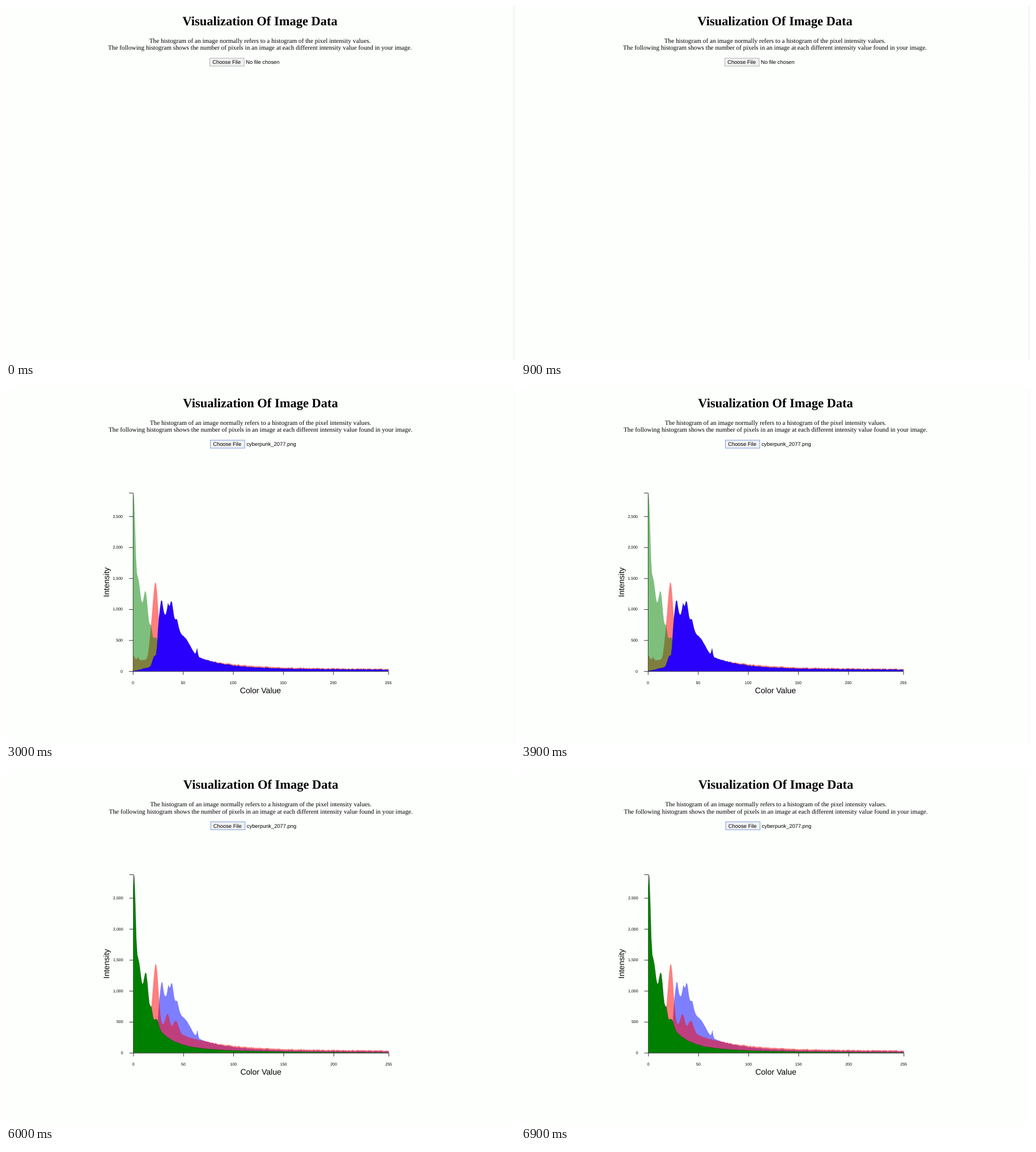
Write an HTML page that moves like this. It is 898 by 624 pixels and loops after 7.5 s.

```html
<!DOCTYPE html>
<html lang="en">
<head>
<meta charset="utf-8">
<title>Visualization Of Image Data</title>
<style>
  html, body { margin: 0; width: 100%; height: 100%; overflow: hidden; background: #fdfffd; }
  svg { display: block; width: 898px; height: 624px; }
  text { fill: #000; text-rendering: geometricPrecision; }
  .serif { font: 11.27px "Liberation Serif", "Times New Roman", serif; text-anchor: middle; }
  .title { font-size: 22.5px; font-weight: bold; }
  .sans { font: 9.37px "Liberation Sans", Arial, sans-serif; }
  .tick { font-size: 7.03px; }
  .label { font-size: 14.06px; text-anchor: middle; }
  .axis { fill: none; stroke: #000; stroke-width: 0.8; }
  .area { opacity: 0.5; }
  .active { opacity: 1; stroke: #000; stroke-opacity: 0.3; stroke-width: 0.7; }
  .scene { visibility: hidden; animation: show 7.5s step-end infinite; }
  @keyframes show {
    0% { visibility: visible; }
    20%, 100% { visibility: hidden; }
  }
</style>
</head>
<body>
<svg id="stage" viewBox="0 0 898 624"></svg>
<script>
const X0 = 223, Y0 = 498, MAX = 255, TOP = 2880;
const px = v => X0 + v * 1.767;
const py = v => Y0 - v * 0.1092;

// decays: [height, length]; peaks: [centre, height, width];
// onset: [centre, width] of the rise from the low plateau to the decays.
const channels = {
  red: {
    soft: '#f00', solid: '#f00', grain: 8, low: 185, onset: [16.2, 0.9],
    decays: [[800, 40], [60, 500]],
    peaks: [[0, 85, 1.3], [5, 45, 0.7], [19.6, 180, 1.8], [22.8, 890, 2.3], [34.2, 240, 2], [42.5, 190, 2.6]]
  },
  green: {
    soft: '#008000', solid: '#008000', grain: 3, low: 0, onset: [-20, 1],
    decays: [[1470, 16.2], [110, 90]],
    peaks: [[0.9, 1350, 1.3], [5.5, 330, 2], [12.7, 530, 2], [18, 160, 1], [23.5, 110, 1.8]]
  },
  blue: {
    soft: '#00f', solid: '#2800fc', grain: 6, low: 0, onset: [24.6, 0.6],
    decays: [[1850, 28], [60, 300]],
    peaks: [[14, 55, 6], [21.5, 200, 2.2], [28.5, 300, 1.3], [35, 150, 0.8], [38, 400, 6.5],
      [38.5, 220, 1.3], [44, 100, 1.2], [53, 165, 5], [64, 120, 0.6]]
  }
};

function random(seed) {
  return () => (seed = (seed * 16807) % 2147483647) / 2147483647;
}

const sum = (list, fn) => list.reduce((total, item) => total + fn(item), 0);

function count(v, { low, onset: [start, width], decays, peaks }) {
  const rise = 1 / (1 + Math.exp((start - v) / width));
  const body = sum(decays, ([h, len]) => h * Math.exp(-v / len));
  const bumps = sum(peaks, ([c, h, w]) => h * Math.exp(-((v - c) ** 2) / (2 * w * w)));
  return low * (1 - rise) + body * rise + bumps;
}

function areaPath(channel) {
  const rnd = random(70707);
  let d = `M${px(0)} ${Y0}`;
  for (let v = 0; v <= MAX; v++) {
    const n = count(v, channel) + (rnd() * 2 - 1) * channel.grain;
    d += `L${px(v).toFixed(2)} ${py(Math.min(TOP, Math.max(0, n))).toFixed(2)}`;
  }
  return d + `L${px(MAX)} ${Y0}Z`;
}

const text = (x, y, cls, str, extra = '') =>
  `<text x="${x}" y="${y}" class="${cls}" ${extra}>${str}</text>`;

function header(file, border) {
  return text(448, 32.7, 'serif title', 'Visualization Of Image Data') +
    text(448, 63.4, 'serif', 'The histogram of an image normally refers to a histogram of the pixel intensity values.') +
    text(448, 76, 'serif', 'The following histogram shows the number of pixels in an image at each different intensity value found in your image.') +
    `<rect x="359.5" y="90.7" width="60.6" height="14" fill="#f1f1f2" stroke="${border}"/>` +
    text(364.2, 101.2, 'sans', 'Choose File') +
    text(423.2, 101.2, 'sans', file);
}

function axes() {
  let lines = `M215.5 ${py(TOP)}H${X0}V${Y0}H${px(MAX)}`;
  let labels = '';
  for (let v = 0; v <= 2500; v += 500) {
    lines += `M215.5 ${py(v)}H${X0}`;
    labels += text(205, py(v) + 2.4, 'sans tick', v.toLocaleString('en-US'), 'text-anchor="end"');
  }
  for (const v of [0, 50, 100, 150, 200, MAX]) {
    lines += `M${px(v)} ${Y0}v6`;
    labels += text(px(v), 520.4, 'sans tick', v, 'text-anchor="middle"');
  }
  return `<path class="axis" d="${lines}" transform="translate(0.35 0.35)"/>` + labels +
    text(448, 536.4, 'sans label', 'Color Value') +
    text(0, 0, 'sans label', 'Intensity', 'transform="translate(180.5 341) rotate(-90)"');
}

// The last channel in the order lies on top; the active one is opaque.
function chart(order, active) {
  return axes() + order.map(name => {
    const c = channels[name], on = name === active;
    return `<path class="area ${on ? 'active' : ''}" d="${areaPath(c)}" fill="${on ? c.solid : c.soft}"/>`;
  }).join('');
}

const scenes = [
  { dx: 0, dy: 1.3, edge: 5 },
  { dx: 0, dy: 0, edge: 1, order: ['red', 'green', 'blue'] },
  { dx: 1, dy: 1.3, edge: 1, order: ['red', 'green', 'blue'], active: 'blue' },
  { dx: -1, dy: 1.3, edge: 1, order: ['green', 'blue', 'red'], active: 'red' },
  { dx: 1.6, dy: 0.6, edge: 0, order: ['blue', 'red', 'green'], active: 'green' }
];

const shade = `<linearGradient id="shade">
  <stop stop-color="#fdfffd"/><stop offset="1" stop-color="#f1f2f1"/>
</linearGradient>`;

document.getElementById('stage').innerHTML = shade + scenes.map((s, i) => {
  const head = s.order ? header('cyberpunk_2077.png', '#7b9be0') : header('No file chosen', '#b0b0b0');
  return `<g class="scene" style="animation-delay:${i * 1.5}s">` +
    `<rect x="${898 - s.edge}" width="${s.edge}" height="624" fill="url(#shade)"/>` +
    `<g transform="translate(${s.dx} ${s.dy})">${head}${s.order ? chart(s.order, s.active) : ''}</g></g>`;
}).join('');
</script>
</body>
</html>
```
